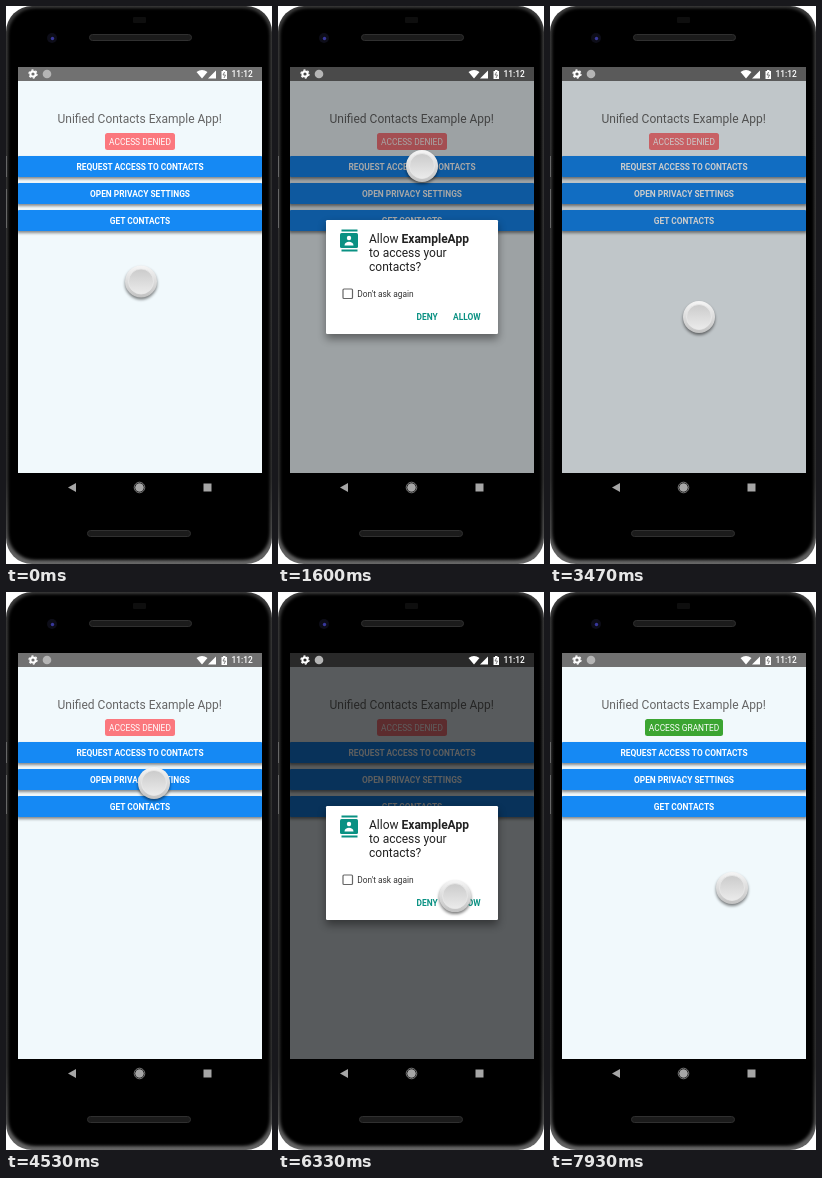
Recreate the animation shown at these times as an HTML page. Size 266 by 558 pixels, loop 8 s.

```html
<!DOCTYPE html>
<html lang="en">
<head>
<meta charset="utf-8">
<title>Contacts permission demo</title>
<style>
  html, body { margin: 0; width: 100%; height: 100%; overflow: hidden; background: #fff; }
  svg { display: block; width: 100%; height: 100%; }
  text { font-family: Roboto, "Open Sans", sans-serif; font-size: 8.37px; }
  .big { font-size: 12px; }
  .medium { font-weight: 500; }
  .strong { font-weight: 700; }
  .mid { text-anchor: middle; }
</style>
</head>
<body>
<svg viewBox="0 0 266 558">
  <defs>
    <linearGradient id="metal" x2="0" y2="1">
      <stop stop-color="#3c3c3c"/><stop offset=".85" stop-color="#343434"/><stop offset="1" stop-color="#666"/>
    </linearGradient>
    <linearGradient id="rim" x2="0" y2="1">
      <stop stop-color="#f6f6f6"/><stop offset="1" stop-color="#c2c2c2"/>
    </linearGradient>
    <linearGradient id="face" x2="0" y2="1">
      <stop stop-color="#cbcbcb"/><stop offset="1" stop-color="#ebebeb"/>
    </linearGradient>
    <filter id="soft" x="-50%" y="-50%" width="200%" height="200%">
      <feGaussianBlur stdDeviation="1.5"/>
    </filter>
    <filter id="wide" x="-20%" y="-20%" width="140%" height="140%">
      <feGaussianBlur stdDeviation="4"/>
    </filter>
    <clipPath id="view"><rect x="12" y="61" width="244" height="406"/></clipPath>
  </defs>

  <!-- phone body -->
  <rect width="266" height="558" rx="26" fill="url(#metal)"/>
  <rect x="2" y="2" width="262" height="552" rx="27" filter="url(#soft)"/>
  <path d="M.5 150V171M.5 183V222" stroke="#666"/>
  <rect x="127" y="11" width="13" height="6" rx="1" fill="#0e0e0e"/>
  <g fill="#1b1b1b" stroke="#303030">
    <rect x="83.5" y="28.5" width="102" height="6" rx="3"/>
    <rect x="81.5" y="524.5" width="103" height="6" rx="3"/>
  </g>
  <circle cx="46" cy="32" r="5" fill="#0d0d18"/>
  <circle cx="46.5" cy="32.5" r="1.7" fill="#38389c"/>
  <g fill="#a6a6a6">
    <path d="M62 481.5L70 477V486Z"/>
    <circle cx="133.5" cy="481.5" r="4.3"/>
    <circle cx="133.5" cy="481.5" r="5.3" fill="none" stroke="#a6a6a6" stroke-width=".7"/>
    <rect x="197.5" y="477.5" width="8" height="8"/>
  </g>

  <!-- app -->
  <g clip-path="url(#view)">
    <rect x="12" y="61" width="244" height="406" fill="#f1f9fc"/>
    <rect x="12" y="61" width="244" height="14" fill="#717171"/>
    <text class="big mid" x="133.7" y="117" fill="#666">Unified Contacts Example App!</text>
    <rect id="badge" y="127" height="17" rx="2.5"/>
    <text id="status" class="mid" x="134" y="138.7" fill="#fff"></text>
    <g id="buttons"></g>
    <rect id="dim" x="12" y="61" width="244" height="406"/>
  </g>

  <!-- status icons -->
  <g fill="#fff">
    <circle cx="27" cy="68" r="2.6" fill="none" stroke="#fff" stroke-width="2"/>
    <circle cx="27" cy="68" r="4" fill="none" stroke="#fff" stroke-width="1.3" stroke-dasharray="2.09"/>
    <circle cx="41" cy="68" r="4.3" fill="#b5b5b5"/>
    <path d="M190.500 66Q196 62 201.500 66L196 72.500ZM202 72.500L210 64.500V72.500ZM215.500 65H217V64H219.500V65H221V73H215.500Z"/>
    <path d="M218.600 66L217 69H219.500L218 72" fill="none" stroke="#666" stroke-width=".8"/>
    <text class="medium" x="225.5" y="71.3">11:12</text>
  </g>

  <!-- permission dialog -->
  <g id="dialog">
    <rect x="48" y="218" width="172" height="115" opacity=".4" filter="url(#wide)"/>
    <rect x="48" y="214" width="172" height="114" rx="1.2" fill="#fff"/>
    <g fill="#0a9183">
      <path d="M63.500 223.500H79.500V225.500H63.500ZM63.500 243.500H79.500V245.500H63.500Z"/>
      <rect x="62" y="227" width="18" height="15" rx="1.5"/>
      <text class="strong" x="138.5" y="314.3">DENY</text>
      <text class="strong" x="175" y="314.3">ALLOW</text>
    </g>
    <circle cx="71" cy="232" r="2.2" fill="#fff"/>
    <path d="M66.500 239.500C66.500 234.500 75.500 234.500 75.500 239.500Z" fill="#fff"/>
    <g fill="#212121">
      <text class="big" x="91" y="237">Allow <tspan class="strong">ExampleApp</tspan></text>
      <text class="big" x="91" y="251">to access your</text>
      <text class="big" x="91" y="265">contacts?</text>
    </g>
    <rect x="65" y="283" width="9.5" height="9.5" rx="1" fill="none" stroke="#666" stroke-width="1.2"/>
    <text x="79.3" y="290.5" fill="#333">Don't ask again</text>
  </g>

  <g id="pointer">
    <circle cy="2" r="16" opacity=".5" filter="url(#soft)"/>
    <circle r="16" fill="url(#rim)"/>
    <circle r="12.5" fill="url(#face)" stroke="#e9e9e9" stroke-width=".8"/>
  </g>
</svg>
<script>
const LOOP = 8000, FADE = 400, GRANTED = 6930;
const dialogs = [[1380, 3200], [5050, 6870]];
const taps = [1200, 3130, 5000, 6800];
// time, x, y
const path = [
  [0, 135, 275.5], [130, 136, 276], [240, 136, 276], [620, 140, 218], [1040, 144, 160],
  [1930, 144, 160], [2200, 151, 194], [2270, 153, 211], [2450, 154, 257], [2850, 149, 311],
  [3800, 149, 311], [4000, 149, 293], [4530, 148, 191], [4870, 148, 168], [5000, 148, 163],
  [5740, 148, 163], [5870, 151, 173], [6100, 164, 244], [6330, 177, 304], [6560, 181, 312],
  [7620, 181, 312], [7930, 182, 296], [8000, 183, 290]
];

const el = id => document.getElementById(id);
const clamp = v => Math.max(0, Math.min(1, v));

el("buttons").innerHTML = ["REQUEST ACCESS TO CONTACTS", "OPEN PRIVACY SETTINGS", "GET CONTACTS"]
  .map((label, i) => `<g transform="translate(0 ${i * 27})">
    <rect x="11" y="152" width="246" height="21" opacity=".45" filter="url(#soft)"/>
    <rect x="12" y="150" width="244" height="21" rx="1" fill="#1589f4"/>
    <text class="strong mid" x="134" y="164" fill="#fff">${label}</text></g>`).join("");

const slope = (i, k) => (path[i + 1][k] - path[i][k]) / (path[i + 1][0] - path[i][0]);

// harmonic mean of neighbouring slopes, so the curve never overshoots
function tangent(i, k) {
  if (i === 0) return 0;
  const a = slope(i - 1, k);
  if (i === path.length - 1) return a;
  const b = slope(i, k);
  return a * b > 0 ? 2 * a * b / (a + b) : 0;
}

function along(t, k) {
  let i = 0;
  while (t > path[i + 1][0]) i++;
  const p = path[i], q = path[i + 1], h = q[0] - p[0], u = (t - p[0]) / h, v = 1 - u;
  return p[k] * v * v * (1 + 2 * u) + q[k] * u * u * (3 - 2 * u)
    + h * u * v * (tangent(i, k) * v - tangent(i + 1, k) * u);
}

// summed over all dialogs: 0 closed, 1 open
const openness = (t, fade) => dialogs.reduce((sum, [open, close]) =>
  sum + clamp((t - open) / fade) - clamp((t - close) / fade), 0);

function draw(now) {
  const t = now % LOOP, granted = t >= GRANTED, width = granted ? 78 : 70;
  el("badge").setAttribute("x", 134 - width / 2);
  el("badge").setAttribute("width", width);
  el("badge").setAttribute("fill", granted ? "#3ca532" : "#fb787e");
  el("status").textContent = granted ? "ACCESS GRANTED" : "ACCESS DENIED";
  el("dim").setAttribute("opacity", 0.63 * openness(t, FADE));
  el("dialog").setAttribute("opacity", openness(t, 130));
  const press = Math.max(...taps.map(tap => clamp(1 - Math.abs(t - tap) / 100)));
  el("pointer").setAttribute("transform",
    `translate(${along(t, 1)} ${along(t, 2)}) scale(${1 - 0.06 * press})`);
  requestAnimationFrame(draw);
}
draw(performance.now());
</script>
</body>
</html>
```
